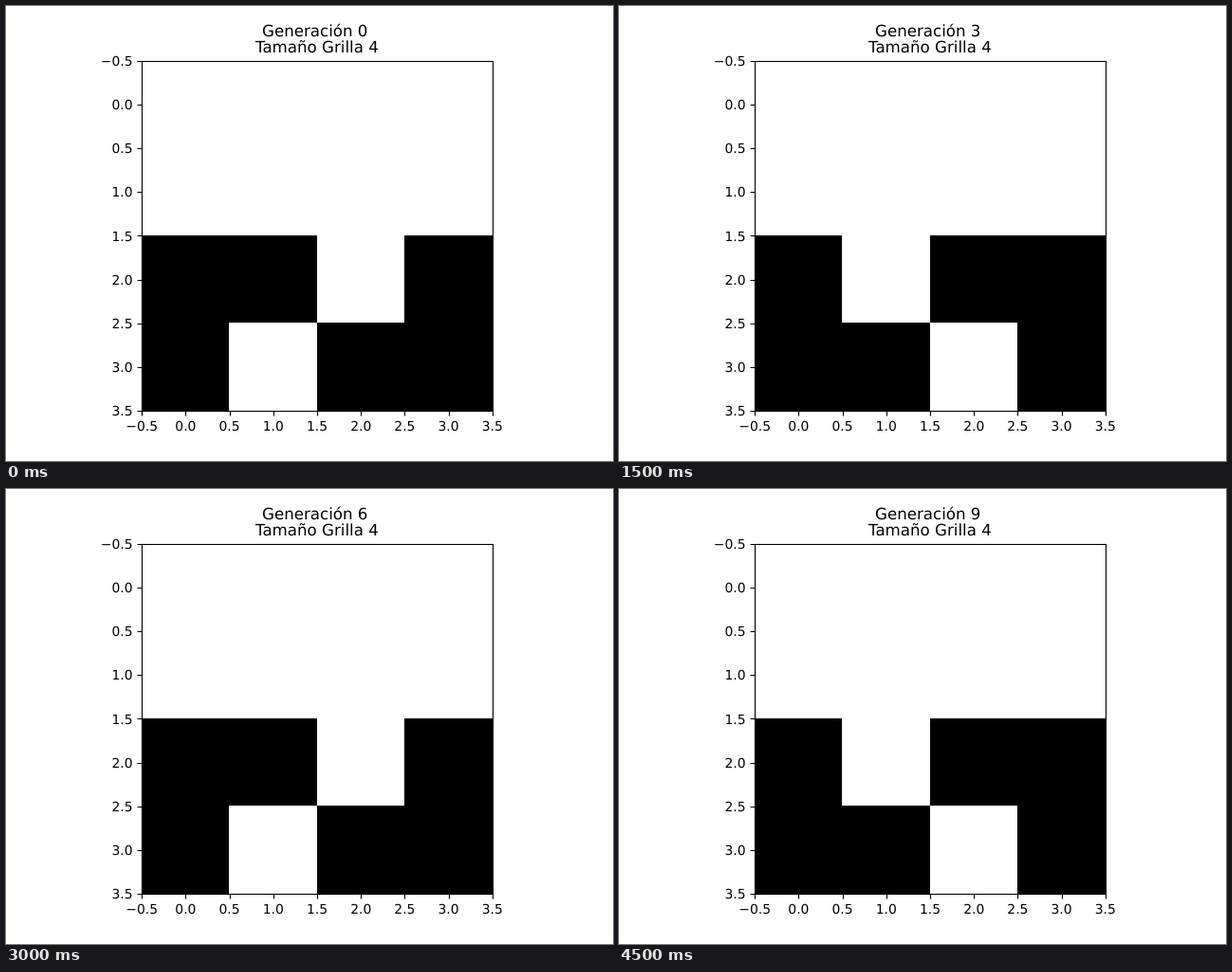
These frames come from a looping animation (640 px wide and 480 px high, 5000 ms). An HTML page:

```html
<!DOCTYPE html>
<html lang="es">
<head>
<meta charset="utf-8">
<title>Generaciones</title>
<style>
  html, body { margin: 0; width: 100%; height: 100%; overflow: hidden; background: #fff; }
  svg { display: block; width: 640px; height: 480px; }
  text { font-family: "DejaVu Sans", sans-serif; font-size: 13.889px; white-space: pre; text-rendering: geometricPrecision; }
  .title { font-size: 16.667px; }
  .axis { fill: none; stroke: #000; stroke-width: 1.11; }
</style>
</head>
<body>
<svg viewBox="0 0 640 480">
  <rect width="640" height="480" fill="#fff"/>
  <g id="cells" shape-rendering="crispEdges"></g>
  <rect class="axis" x="143.5" y="58.5" width="370" height="369"/>
  <g id="ticks"></g>
  <text class="title" id="generation" x="270" y="32"></text>
  <text class="title" x="263" y="49">Tamaño Grilla 4</text>
</svg>
<script>
const STEP = 500, COUNT = 10;
const LEFT = 143.2, TOP = 57.6, TICK = 46.2;
const COLS = [143, 235, 328, 420, 513];
const ROWS = [58, 150, 242, 334, 427];
const GRIDS = [
  ["0000", "0000", "1101", "1011"],
  ["0000", "0000", "1011", "1101"]
];
const byId = id => document.getElementById(id);

function add(parent, name, attrs, text = "") {
  const node = document.createElementNS("http://www.w3.org/2000/svg", name);
  for (const key in attrs) node.setAttribute(key, attrs[key]);
  node.textContent = text;
  return parent.appendChild(node);
}

function drawTicks() {
  const ticks = byId("ticks");
  for (let i = 0; i < 9; i++) {
    const label = (i / 2 - 0.5).toFixed(1).replace("-", "\u2212");
    const x = LEFT + i * TICK, y = TOP + i * TICK;
    const px = Math.round(x) + 0.5, py = Math.round(y) + 0.5;
    add(ticks, "path", { class: "axis", d: `M${px} 427.5v5M143.5 ${py}h-5` });
    add(ticks, "text", { x, y: 448, "text-anchor": "middle" }, label);
    add(ticks, "text", { x: 133.5, y: Math.round(y + 5.2), "text-anchor": "end" }, label);
  }
}

const cells = GRIDS[0].map((_, r) => COLS.slice(0, 4).map((x, c) =>
  add(byId("cells"), "rect", {
    x, y: ROWS[r], width: COLS[c + 1] - x, height: ROWS[r + 1] - ROWS[r]
  })));

let shown = -1;
function render(ms) {
  const gen = Math.floor(ms / STEP) % COUNT;
  if (gen === shown) return;
  shown = gen;
  byId("generation").textContent = `Generación ${gen}`;
  cells.forEach((row, r) => row.forEach((cell, c) =>
    cell.setAttribute("fill", GRIDS[gen % 2][r][c] === "1" ? "#000" : "#fff")));
}

function loop() {
  render(performance.now());
  requestAnimationFrame(loop);
}

drawTicks();
loop();
</script>
</body>
</html>
```
